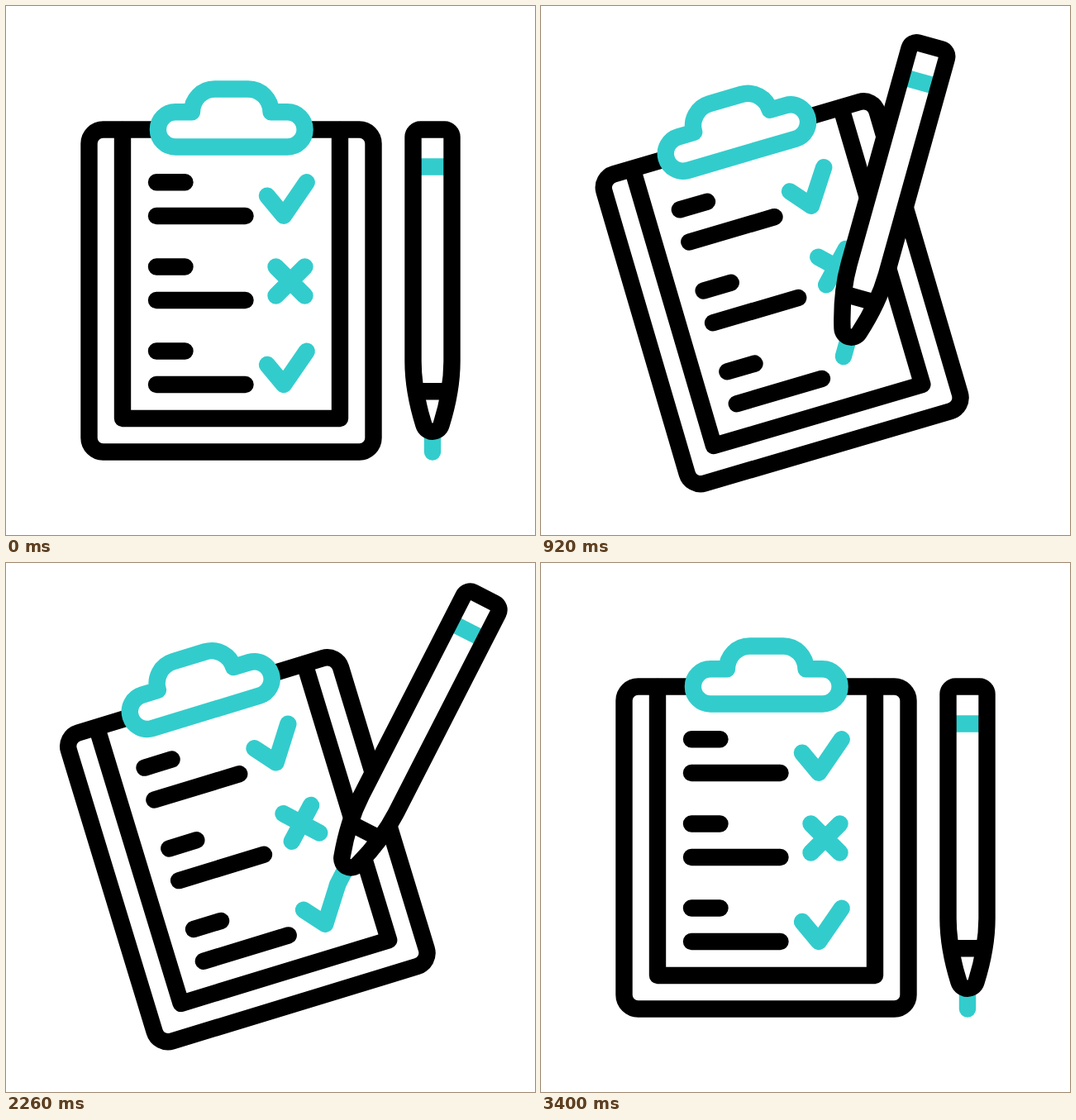
These frames come from a looping animation (640 by 640 pixels, 3600 ms). An HTML page:

```html
<!DOCTYPE html>
<html lang="en">
<head>
<meta charset="utf-8">
<title>Checklist</title>
<style>
  html, body { margin: 0; width: 100%; height: 100%; overflow: hidden; background: #fff; }
  svg { display: block; width: 100%; height: 100%; }
  .ink { fill: none; stroke: #000; stroke-width: 20.4; stroke-linecap: round; stroke-linejoin: round; }
  .teal { stroke: #33cccc; }
  .paper { fill: #fff; }
  .flat { stroke-linecap: butt; }
</style>
</head>
<body>
<svg viewBox="0 0 640 640">
  <g id="board" class="ink">
    <rect class="paper" x="100.5" y="149.5" width="344" height="390" rx="17"/>
    <path d="M141 150V499H404V150"/>
    <path class="teal paper" d="M205 128.3H225A27.5 27.8 0 0 1 252.5 100.5H293A27.5 27.8 0 0 1 320.5 128.3H340.5A21.1 21.1 0 0 1 340.5 170.5H205A21.1 21.1 0 0 1 205 128.3Z"/>
    <path d="M182 213.3H216.5M182 254H289.5M182 315.5H216.5M182 356H289.5M182 417.5H216.5M182 458H289.5"/>
    <path class="teal" d="M316 229.7L336 253.7L363.7 213.3M326.5 315.5L361.5 350.5M361.5 315.5L326.5 350.5"/>
    <path class="teal" id="tick" pathLength="1" d="M316 434L336 458L363.7 417.7"/>
  </g>
  <g id="pen" class="ink">
    <path class="teal" d="M516 512V539.5"/>
    <path class="paper" stroke="none" d="M492.5 158V430C492.5 457 498 483 505.5 507H526.5C534 483 539.5 457 539.5 430V158Z"/>
    <path class="teal flat" d="M496 194.5H536"/>
    <path class="flat" d="M496 466.3H536"/>
    <path d="M501.5 149.5H530.5A9 9 0 0 1 539.5 158.5V430C539.5 457 534 483 526.5 507A11 11 0 0 1 505.5 507C498 483 492.5 457 492.5 430V158.5A9 9 0 0 1 501.5 149.5Z"/>
  </g>
</svg>
<script>
const LOOP = 3600;
const TILT = 16.95;
const [board, pen, tick] = ['board', 'pen', 'tick'].map(id => document.getElementById(id));

// Pen poses: nib x, nib y, angle
const REST = [516, 539.5, 0];
const START = [360, 419.6, 16.2];
const END = [401, 389.3, 27.1];
const VERTEX = [386.3, 437];
const BEND = 0.386; // share of the tick's length before its corner

const lerp = (a, b, f) => a + (b - a) * f;
const mix = (p, q, f) => p.map((v, i) => lerp(v, q[i], f));
const ease = (t, from, to) => {
  const u = Math.min(1, Math.max(0, (t - from) / (to - from)));
  return u * u * (3 - 2 * u);
};

// Smooth curve through [time, value] keys, flat at both ends and along holds
function track(keys) {
  const slope = i => (keys[i + 1][1] - keys[i][1]) / (keys[i + 1][0] - keys[i][0]);
  const tangents = keys.map((k, i) => {
    if (!i || i === keys.length - 1) return 0;
    const a = slope(i - 1), b = slope(i);
    if (a * b <= 0) return 0;
    const before = k[0] - keys[i - 1][0], after = keys[i + 1][0] - k[0];
    return (a * after + b * before) / (before + after);
  });
  return t => {
    const last = keys.length - 1;
    if (t >= keys[last][0]) return keys[last][1];
    const i = keys.findIndex(k => k[0] > t) - 1;
    const [t0, v0] = keys[i], [t1, v1] = keys[i + 1];
    const h = t1 - t0, u = (t - t0) / h, w = 1 - u;
    return v0 * w * w * (1 + 2 * u) + v1 * u * u * (3 - 2 * u)
      + h * u * w * (tangents[i] * w - tangents[i + 1] * u);
  };
}

const tilt = track([[0, 0], [320, 0.285], [540, 0.64], [920, 0.965], [1100, 1],
  [2300, 1], [2640, 0.842], [3040, 0.36], [3260, 0.08], [3400, 0]]);
const reach = track([[0, 0], [320, 0.338], [540, 0.705], [920, 0.962], [1100, 1]]);
const written = t => ease(t, 1100, 2220);

function penPose(t) {
  if (t < 1100) return mix(REST, START, reach(t));
  if (t >= 2300) return mix(END, REST, ease(t, 2300, 3400));
  const f = written(t);
  const nib = f < BEND
    ? mix(START.slice(0, 2), VERTEX, f / BEND)
    : mix(VERTEX, END, (f - BEND) / (1 - BEND));
  return [...nib, lerp(START[2], END[2], f)];
}

function draw(t) {
  board.setAttribute('transform', `rotate(${-TILT * tilt(t)} 290 279)`);

  const [x, y, angle] = penPose(t);
  pen.setAttribute('transform', `translate(${x} ${y}) rotate(${angle}) translate(${-REST[0]} ${-REST[1]})`);

  const shown = t < 1100 ? 1 - ease(t, 0, 500) : written(t);
  tick.setAttribute('visibility', shown > 0 ? 'visible' : 'hidden');
  tick.setAttribute('stroke-dasharray', shown < 1 ? `${shown} 2` : 'none');
}

const begin = performance.now();
function frame() {
  draw((performance.now() - begin) % LOOP);
  requestAnimationFrame(frame);
}
frame();
</script>
</body>
</html>
```
